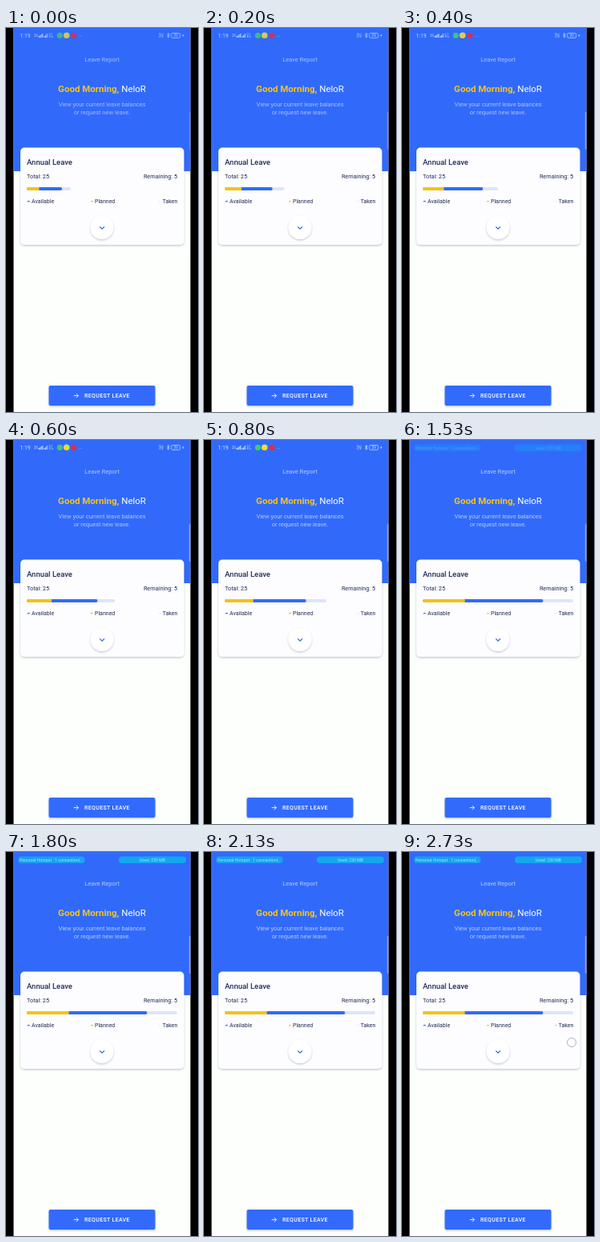
Animation of 240x480 px, one loop 2790 ms. Source, as an HTML page:

```html
<!DOCTYPE html>
<html lang="en">
<head>
<meta charset="utf-8">
<title>Leave Report</title>
<style>
html, body { margin: 0; width: 100%; height: 100%; overflow: hidden; background: #000; }
svg { display: block; width: 100%; height: 100%; font-family: Roboto, sans-serif; }
.mid { text-anchor: middle; }
.end { text-anchor: end; }
.strong { font-weight: 500; }
</style>
</head>
<body>
<svg viewBox="0 0 240 480">
  <defs>
    <filter id="soft" x="-40%" y="-40%" width="180%" height="190%">
      <feDropShadow dx="0" dy="1.2" stdDeviation="1.3" flood-color="#253050" flood-opacity=".28"/>
    </filter>
    <clipPath id="track"><rect id="trackClip" x="26" y="199" height="4" rx="2"/></clipPath>
  </defs>

  <rect width="240" height="480"/>
  <rect x="9.5" width="221" height="480" fill="#fcfffc"/>
  <rect x="9.5" width="221" height="179" fill="#316afb"/>
  <rect id="handle" x="228.8" y="105" width="1.9" height="47" rx=".9" fill="#8b9bc9"/>

  <g id="status" fill="#fff" stroke="none">
    <g fill="#dce7ff">
      <text x="17.5" y="12" font-size="6.8">1:19</text>
      <text x="35" y="11" font-size="4.5">2il</text>
      <path d="M41 12v-2m1.6 2v-3m1.6 3v-4m1.6 4v-5m2.2 5v-2m1.6 2v-3m1.6 3v-5" stroke="#dce7ff"/>
      <text x="53.5" y="8.6" font-size="3.6">0.1</text>
      <text x="53.5" y="12.2" font-size="3.6">K/s</text>
      <text x="91" y="10.5" font-size="6">...</text>
      <text x="191" y="9" font-size="3.8">Vo)</text>
      <text x="191" y="12.4" font-size="3.8">LTE</text>
    </g>
    <circle cx="67.3" cy="9.3" r="3.6" fill="#45c96b"/>
    <circle cx="75.7" cy="9.3" r="3.8" fill="#f1dc3b"/>
    <circle cx="84.7" cy="9.3" r="3.6" fill="#ee2939"/>
    <g fill="none" stroke="#dce7ff" stroke-width=".7">
      <path d="M201.3 7.7l3 3-1.5 1.5V6.3l1.5 1.5-3 3"/>
      <rect x="206.7" y="6.4" width="11" height="6" rx="1.8"/>
      <path d="M221.4 7.8v3m-1-1.5h2"/>
    </g>
    <text class="mid" x="212.2" y="11.2" font-size="4.8" fill="#dce7ff">39</text>
  </g>

  <g id="pills" font-size="5.2" fill="#a9e7ff">
    <rect x="15" y="5.5" width="83.5" height="8.5" rx="4" fill="#18a0ef"/>
    <rect x="141" y="5.5" width="84" height="8.5" rx="4" fill="#13a8ee"/>
    <text x="17" y="11.7">Personal Hotspot : 1 connection(...</text>
    <text class="mid" x="183" y="11.7">Used: 220 MB</text>
  </g>

  <g id="intro" class="mid" fill="#fff" font-size="7.5">
    <text x="120" y="42">Leave Report</text>
    <text x="120" y="98.2">View your current leave balances</text>
    <text x="120" y="108.4">or request new leave.</text>
  </g>
  <text class="mid" x="120" y="80.3" font-size="11.5" fill="#fff"><tspan font-weight="700" fill="#f6c31b">Good Morning,</tspan> NeloR</text>

  <rect x="18" y="149.5" width="204.5" height="121.5" rx="5" fill="#fdfdff" filter="url(#soft)"/>
  <g fill="#202a55">
    <text class="strong" x="26" y="171" font-size="9.5">Annual Leave</text>
    <g font-size="7.3">
      <text x="26" y="188.2">Total: 25</text>
      <text class="end" x="214" y="188.2">Remaining: 5</text>
    </g>
    <g font-size="7">
      <text x="32" y="218.6">Available</text>
      <text x="111" y="218.6">Planned</text>
      <text class="end" x="214.3" y="218.6">Taken</text>
    </g>
  </g>
  <path d="M26 217.2q2.2-3 4.4 0z" fill="#316afb"/>
  <path d="M105.2 217.2q2.2-3 4.4 0z" fill="#f5c211"/>
  <path id="takenMark" d="M190.2 217.2q2.2-3 4.4 0z" fill="#c9d2e6"/>

  <g clip-path="url(#track)">
    <rect x="26" y="199" width="188" height="4" fill="#dce5fa"/>
    <rect id="available" x="26" y="199" height="4" rx="2" fill="#316afb"/>
    <rect id="planned" x="26" y="199" height="4" fill="#f5c211"/>
  </g>

  <circle cx="120" cy="249.5" r="14.5" fill="#fff" filter="url(#soft)"/>
  <path d="M117.2 248.3l2.9 2.9 2.9-2.9" fill="none" stroke="#2f63d6" stroke-width="1.2"/>
  <circle id="touch" cx="212" cy="238" r="5.5" fill="#fff" fill-opacity=".6" stroke="#9a9da8" stroke-width=".8"/>

  <rect x="53.5" y="447" width="133" height="25" rx="2" fill="#316afb" filter="url(#soft)"/>
  <path d="M84.6 459.6h5.8m-2.6-2.7l2.7 2.7-2.7 2.7" fill="none" stroke="#fff" stroke-width=".9"/>
  <text class="strong" x="98" y="462.2" font-size="7" letter-spacing=".35" fill="#fff">REQUEST LEAVE</text>
</svg>
<script>
const LOOP = 2790;
const growth = [[0, 55], [400, 94], [800, 127], [1070, 153], [1450, 188]];
const $ = id => document.getElementById(id);
const ramp = (t, from, to) => Math.min(1, Math.max(0, (t - from) / (to - from)));
const setWidth = (id, w) => $(id).setAttribute('width', w.toFixed(2));
const setOpacity = (id, o) => $(id).setAttribute('opacity', o.toFixed(3));

function barWidth(t) {
  return growth.slice(1).reduce((w, [time, value], i) => {
    const [prevTime, prevValue] = growth[i];
    return w + (value - prevValue) * ramp(t, prevTime, time);
  }, growth[0][1]);
}

function draw(t) {
  const w = barWidth(t);
  setWidth('trackClip', w);
  setWidth('available', w * 0.8);
  setWidth('planned', w * 0.28);

  const settle = ramp(t, 0, 800);
  setOpacity('intro', 0.55 + 0.1 * settle);
  setOpacity('handle', 0.4 + 0.6 * ramp(t, 0, 400));
  setOpacity('status', (0.8 + 0.2 * settle) * (1 - ramp(t, 850, 1330)));
  setOpacity('pills', ramp(t, 1420, 1760));
  setOpacity('takenMark', 0.35 + 0.65 * ramp(t, 2200, 2470));
  setOpacity('touch', t >= 2730 ? 1 : 0);
}

const start = performance.now();
function tick() {
  draw((performance.now() - start) % LOOP);
  requestAnimationFrame(tick);
}
tick();
</script>
</body>
</html>
```
